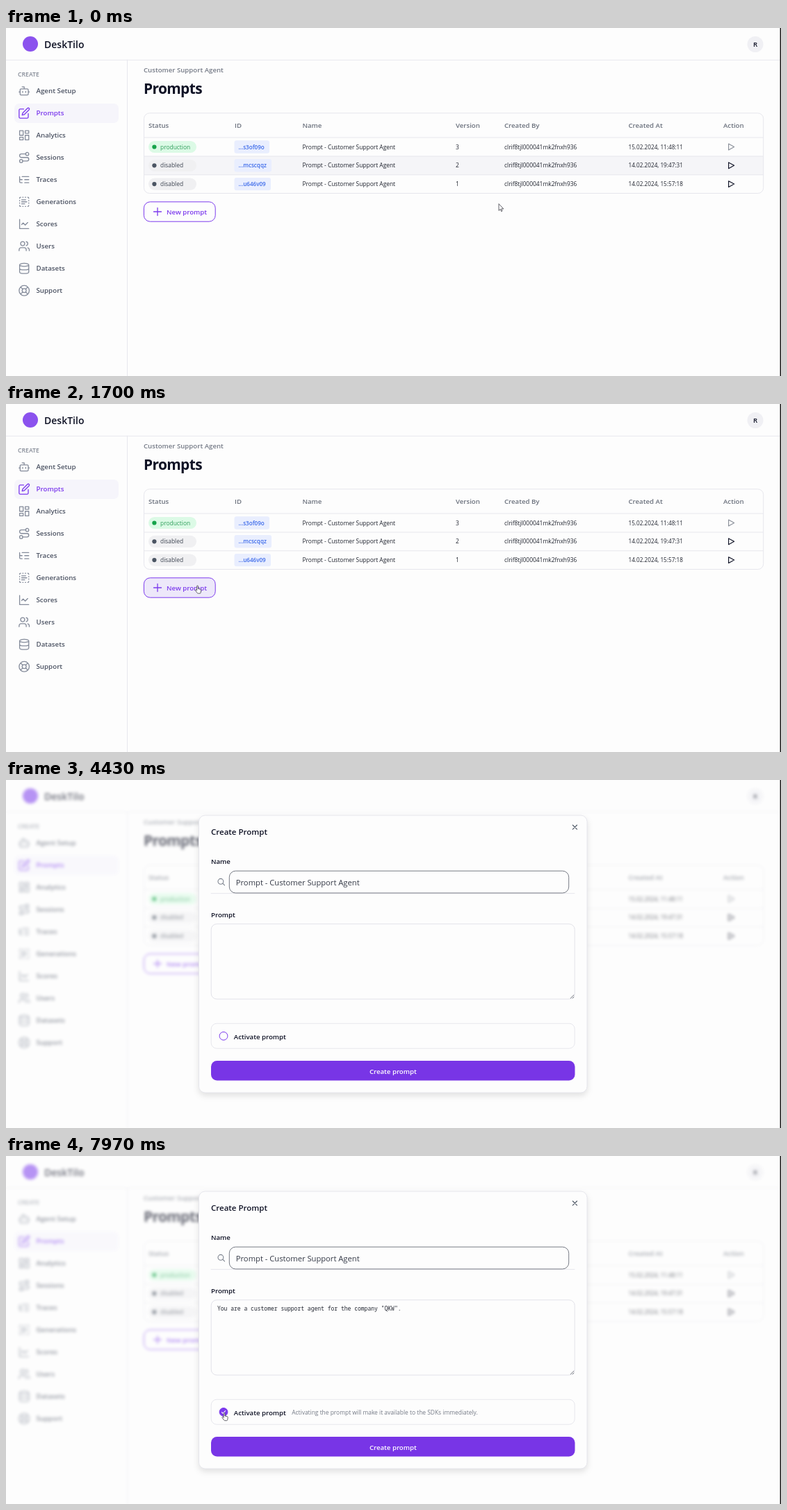
An HTML page that plays this animation: 1115 px wide and 502 px high, repeating every 8 s.

```html
<!DOCTYPE html>
<html lang="en">
<head>
<meta charset="utf-8">
<title>Prompts</title>
<style>
html, body { margin: 0; width: 100%; height: 100%; overflow: hidden; background: #fdfdfd; }
svg { display: block; width: 1115px; height: 502px; }
text { font-family: "Open Sans", "Noto Sans", sans-serif; white-space: pre; }
.mono { font-family: "Noto Sans Mono", "DejaVu Sans Mono", monospace; }
</style>
</head>
<body>
<svg id="stage" viewBox="0 0 1115 502" xmlns="http://www.w3.org/2000/svg"></svg>
<script>
const LOOP = 8000;
const VIOLET = '#7c3aed', INK = '#0f1225', SLATE = '#4b5262', MUTED = '#747a86', LINE = '#e7e7ed';

// drawing helpers
const text = (x, y, s, size = 8.42, fill = INK, weight = 400, extra = '') =>
  `<text x="${x}" y="${y}" font-size="${size}" fill="${fill}" font-weight="${weight}" ${extra}>${s}</text>`;
const semi = (x, y, s, fill = INK, size = 9.65, extra = '') => text(x, y, s, size, fill, 600, extra);
const box = (x, y, r, b, rad, fill = 'none', stroke = 'none', w = 1, extra = '') =>
  `<rect x="${x}" y="${y}" width="${r - x}" height="${b - y}" rx="${rad}" fill="${fill}" stroke="${stroke}" stroke-width="${w}" ${extra}/>`;
const dot = (x, y, r, fill, extra = '') => `<circle cx="${x}" cy="${y}" r="${r}" fill="${fill}" ${extra}/>`;
const path = (d, stroke, w = 1, fill = 'none', extra = '') =>
  `<path d="${d}" fill="${fill}" stroke="${stroke}" stroke-width="${w}" stroke-linecap="round" stroke-linejoin="round" ${extra}/>`;
const ring = (x, y, r, ry = r) => `M${x - r} ${y}a${r} ${ry} 0 1 0 ${2 * r} 0a${r} ${ry} 0 1 0 ${-2 * r} 0`;
const group = (id, body, extra = '') => `<g id="${id}" ${extra}>${body}</g>`;

// side menu: label and 24-unit icon
const menu = [
  ['Agent Setup', 'M12 8V4H8M6 8h12a2 2 0 0 1 2 2v8a2 2 0 0 1-2 2H6a2 2 0 0 1-2-2v-8a2 2 0 0 1 2-2zM2 14h2M20 14h2M15 13v2M9 13v2'],
  ['Prompts', 'M11 4H4a2 2 0 0 0-2 2v14a2 2 0 0 0 2 2h14a2 2 0 0 0 2-2v-7M18.5 2.5a2.1 2.1 0 0 1 3 3L12 15l-4 1 1-4z'],
  ['Analytics', 'M3 3h7v9H3zM14 3h7v5h-7zM14 12h7v9h-7zM3 16h7v5H3z'],
  ['Sessions', ring(6, 19, 3) + ring(18, 5, 3) + 'M9 19h8.5a3.5 3.5 0 0 0 0-7h-11a3.5 3.5 0 0 1 0-7H15'],
  ['Traces', 'M21 12h-8M21 6H8M21 18h-8M3 6v4q0 2 2 2h3M3 10v6q0 2 2 2h3'],
  ['Generations', 'M5 3q-2 0-2 2M19 3q2 0 2 2M21 19q0 2-2 2M5 21q-2 0-2-2M9 3h1M14 3h1M9 21h1M14 21h1M3 9v1M21 9v1M3 14v1M21 14v1M7 8h8M7 12h10M7 16h6'],
  ['Scores', 'M3 3v18h18M19 9l-5 5-4-4-3 3'],
  ['Users', 'M16 21v-2a4 4 0 0 0-4-4H6a4 4 0 0 0-4 4v2' + ring(9, 7, 4) + 'M22 21v-2a4 4 0 0 0-3-3.9M16 3.1a4 4 0 0 1 0 7.8'],
  ['Datasets', ring(12, 5, 9, 3) + 'M3 5v14a9 3 0 0 0 18 0V5M3 12a9 3 0 0 0 18 0'],
  ['Support', ring(12, 12, 10) + ring(12, 12, 4) + 'M5 5l4.2 4.2M14.8 9.2L19 5M14.8 14.8L19 19M9.2 14.8L5 19']
];

function sidebar() {
  return path('M0 46.2H1113M174.5 46.2V502', LINE) +
    semi(17, 70.4, 'CREATE', '#858b97', 8.7) +
    box(12, 109, 162, 137, 7, '#f6f5fb') +
    menu.map(([label, icon], i) => {
      const y = 90.8 + 32 * i, on = label === 'Prompts';
      return `<g transform="translate(17.4 ${y - 8.8}) scale(.731)">${path(icon, on ? VIOLET : '#858c9b', 1.8)}</g>` +
        semi(43.5, y + 3.6, label, on ? VIOLET : SLATE, 9.75);
    }).join('');
}

const USER = 'clrif8tjl000041mk2fnxh936';
const rows = [
  ['production', '...s3of09o', 379, 3, '15.02.2024, 11:48:11'],
  ['disabled', '...mcscqqz', 382, 2, '14.02.2024, 19:47:31'],
  ['disabled', '...u646v09', 381, 1, '14.02.2024, 15:57:18']
];
const heads = [[205, 'Status'], [329, 'ID'], [426.5, 'Name'], [647, 'Version'], [717, 'Created By'], [895.5, 'Created At'], [1032, 'Action']];

function table() {
  const body = rows.map(([status, id, right, version, date], i) => {
    const y = 171.5 + 26.8 * i, b = y + 3.1, live = i === 0;
    return box(205, y - 8.6, 274, y + 8.6, 8.6, live ? '#dcfae6' : '#f0f0f2') +
      dot(213.4, y, 3.1, live ? '#16a34a' : '#4b5563') +
      text(222, b, status, 8.42, live ? '#2f9e5b' : '#3f4653') +
      box(328.5, y - 9.2, right, y + 9.2, 3, '#e9eefe') +
      semi(334.5, b, id, '#3d6bea', 8.1) +
      text(426.5, b, 'Prompt - Customer Support Agent', 8.42, '#20242f') +
      text(647, b, version, 8.42, '#20242f') +
      text(717, b, USER, 8.42, '#20242f') +
      text(895.5, b, date, 8.2, '#20242f') +
      path(`M1039.6 ${y - 4.4}l8 4.4-8 4.4z`, live ? '#8a8f99' : INK, 1.15);
  }).join('');
  return box(198.5, 185, 1089.5, 211.8, 0, '#f5f5f8', 'none', 0, 'id="rowHover"') +
    box(198.5, 122.8, 1089.7, 238.5, 8, 'none', LINE) +
    path('M198.5 158H1089.5M198.5 185H1089.5M198.5 211.8H1089.5', LINE) +
    heads.map(([x, s]) => semi(x, 144.3, s, '#6a707c')).join('') + body;
}

const page = () =>
  dot(35, 23, 11, '#8b52ee') + semi(55, 28.8, 'DeskTilo', INK, 14) +
  dot(1078, 23.5, 11.5, '#f0f0f4') + semi(1078, 27, 'R', INK, 9.6, 'text-anchor="middle"') +
  sidebar() +
  semi(198, 64, 'Customer Support Agent', MUTED) +
  text(198, 95, 'Prompts', 20.9, INK, 700, 'letter-spacing="-.63"') +
  table() +
  box(198.4, 250.8, 301.2, 279.2, 9, '#ede8fa', 'none', 0, 'id="btnHover"') +
  box(198.4, 250.8, 301.2, 279.2, 9, 'none', VIOLET) +
  path('M212.5 265H223.5M218 259.5V270.5', VIOLET, 1.3) +
  semi(231, 268.8, 'New prompt', VIOLET);

const agent = 'Prompt - Customer Support Agent';
const modal = () =>
  box(277.5, 51, 836, 451, 9, '#fdfdfd', '#e6e6ec', 1, 'style="filter:drop-shadow(0 4px 4px rgba(0,0,0,.11))"') +
  semi(295, 79.2, 'Create Prompt', INK, 11.5) +
  path('M815.3 65l6.2 6.2M821.5 65l-6.2 6.2', '#4b5563', 1.1) +
  semi(295, 121, 'Name') +
  path(ring(308.9, 146.3, 3.9) + 'M311.8 149.2l2.7 2.7', '#7a808c', 1.1) +
  path('M295 163.6H818', LINE) +
  box(321.3, 131.2, 809.7, 163, 9, '#fdfdfd', '#777b85', 1, 'id="nameBox"') +
  text(330.8, 151.9, '', 11.2, INK, 400, 'id="nameText"') +
  path('M330.6 141.5V154', INK, .9, 'none', 'id="nameCaret"') +
  semi(295, 197.5, 'Prompt') +
  box(295.2, 207.7, 818.2, 316, 8, '#fdfdfd', '#e2e2e9') +
  group('focus', box(293.9, 206.5, 819.7, 317.3, 9.5, 'none', '#7036e2', 1.9) + box(295.6, 208.2, 818, 315.7, 8, 'none', '#5a6fb0', .8)) +
  path('M812.3 314.8l4.6-4.6M815.2 314.8l1.8-1.8', '#555a63', .8) +
  text(304, 222.6, 'You are a customer support agent for the company "QKW".', 8.03, '#20242f', 400, 'id="prompt" class="mono"') +
  path('M0 214.5V224.5', INK, .9, 'none', 'id="promptCaret"') +
  group('list', box(295, 166, 818.5, 195.3, 9, '#fdfdfd', '#e6e6ec') + box(296.5, 168, 817.5, 194.3, 9, '#f1f1f4') +
    text(321, 185.1, agent, 9.8, '#3a404d')) +
  box(295.2, 351.2, 818.2, 387.2, 8, 'none', LINE) +
  dot(313, 369.3, 5.9, '#fdfdfd', `id="check" stroke="${VIOLET}" stroke-width="1"`) +
  path('M310.4 369.6l1.8 1.8 3.5-3.9', '#fff', 1.1, 'none', 'id="tick"') +
  semi(327.8, 373.6, 'Activate prompt') +
  text(411.3, 372.8, 'Activating the prompt will make it available to the SDKs immediately.', 8.42, MUTED, 400, 'id="hint"') +
  box(295, 405, 818.5, 433.6, 8.5, '#7835e6') +
  semi(556.8, 423.8, 'Create prompt', '#fff', 9.65, 'text-anchor="middle"');

const pointer =
  path('M0 0V9.4L2.2 7.4 3.6 10.6 5 10 3.6 6.9H6.4Z', '#3c3c44', .8, '#fff', 'id="arrow"') +
  path('M-.9 5.6V.4a.9.9 0 0 1 1.8 0V4l3.4.8q1 .3.9 1.4l-.5 3.2q-.2 1.3-1.2 1.3H.9q-.8 0-1.3-.7L-3 6.6q-.4-.9.5-1.1Q-1.6 5.3-.9 6.2Z', '#3c3c44', .8, '#fff', 'id="hand"') +
  path('M-1.6-4.5H1.6M0-4.5V4.5M-1.6 4.5H1.6', '#3c3c44', .8, 'none', 'id="beam"');

document.getElementById('stage').innerHTML =
  box(0, 0, 1115, 502, 0, '#fdfdfd') + group('page', page()) +
  box(0, 0, 1115, 502, 0, '#fdfdfd', 'none', 0, 'id="veil"') +
  group('modal', modal()) + group('pointer', pointer) + box(1113.6, 0, 1115, 502, 0, '#111');

const el = {};
document.querySelectorAll('[id]').forEach(n => el[n.id] = n);
const show = (id, k) => { el[id].style.opacity = +k; };

// pointer stops: time, x, y
const stops = [[0, 709, 254], [980, 275.5, 262.5], [2150, 275.5, 262.5], [3230, 361, 180.5], [3650, 361, 180.5],
  [4050, 372, 240], [6300, 362, 290], [7080, 314, 371], [LOOP, 314, 371]];
const OPEN = 1730, PICK = 3720, FOCUS = 4700, PASTE = 5100, TICK = 7450;

const ramp = (t, a, len) => Math.min(1, Math.max(0, (t - a) / len));
const ease = k => k * k * (3 - 2 * k);
const blink = (t, from) => t >= from && Math.floor((t - from) / 530) % 2 === 0;

function pointerAt(t) {
  const i = stops.findIndex((s, n) => n && t <= s[0]);
  const [a, ax, ay] = stops[i - 1], [b, bx, by] = stops[i];
  const k = ease((t - a) / (b - a));
  return [ax + (bx - ax) * k, ay + (by - ay) * k];
}

function render(t) {
  const [x, y] = pointerAt(t);
  const open = 1 - (1 - ramp(t, OPEN, 170)) ** 2;
  const onButton = t < OPEN && x < 301 && y > 251;
  const inArea = t > OPEN + 100 && x > 295 && y > 207 && y < 316;
  const onCheck = t > 6300 && Math.hypot(x - 313, y - 369.3) < 9;
  const hand = onButton || onCheck;

  show('rowHover', 1 - ramp(t, 20, 110));
  show('btnHover', t < OPEN ? ramp(t, 870, 130) : 1 - open);
  el.page.style.filter = open ? `blur(${1.9 * open}px)` : 'none';
  show('veil', .38 * open);

  const s = .95 + .05 * open;
  show('modal', open);
  el.modal.setAttribute('transform', `translate(${556.75 * (1 - s)} ${251 * (1 - s)}) scale(${s})`);

  const picked = t >= PICK;
  el.nameBox.setAttribute('stroke', picked ? '#777b85' : '#3468cc');
  el.nameBox.setAttribute('stroke-width', picked ? 1 : 1.7);
  el.nameText.textContent = picked ? agent : 'Select a prompt name';
  el.nameText.setAttribute('fill', picked ? '#343946' : '#7a808c');
  el.nameText.setAttribute('font-size', picked ? 11.2 : 11.05);
  show('nameCaret', !picked && blink(t, 1800));
  show('list', !picked);

  const focused = t >= FOCUS && t < TICK;
  show('focus', focused);
  show('prompt', t >= PASTE);
  show('promptCaret', focused && blink(t, FOCUS));
  el.promptCaret.setAttribute('transform', `translate(${t < PASTE ? 304.3 : 569} 0)`);

  const ticked = t >= TICK;
  el.check.setAttribute('fill', ticked ? VIOLET : '#fdfdfd');
  show('tick', ticked);
  show('hint', ticked);

  el.pointer.setAttribute('transform', `translate(${x} ${y})`);
  show('pointer', !(inArea && t > PICK));
  show('hand', hand);
  show('beam', inArea);
  show('arrow', !hand && !inArea);
}

const start = performance.now();
function tick() {
  render((performance.now() - start) % LOOP);
  requestAnimationFrame(tick);
}
tick();
</script>
</body>
</html>
```
